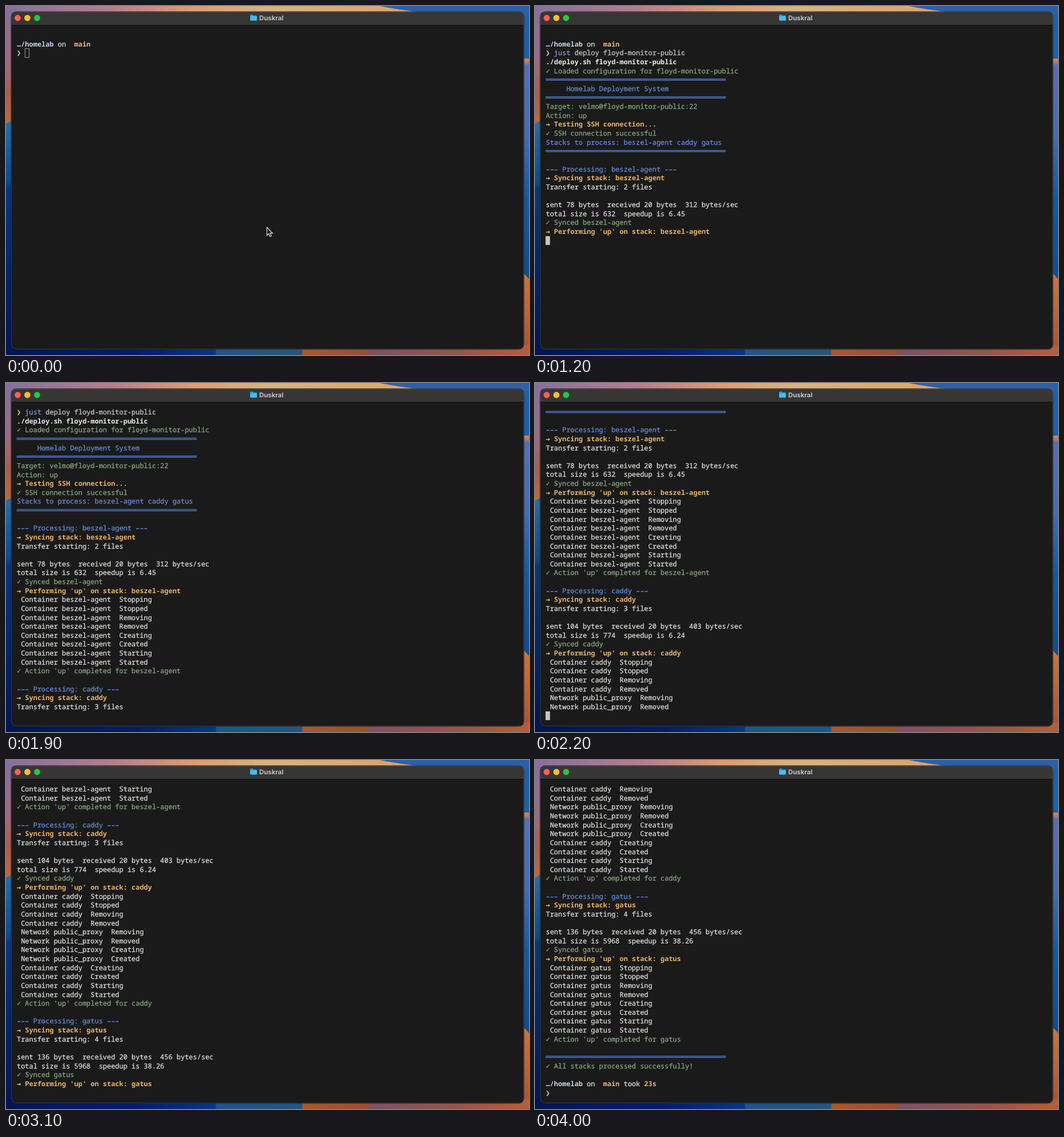
These frames come from a looping animation (917 px wide and 611 px high, 4.05 s). An HTML page:

```html
<!DOCTYPE html>
<html lang="en">
<head>
<meta charset="utf-8">
<title>Terminal deploy</title>
<style>
  html, body { margin: 0; width: 100%; height: 100%; overflow: hidden; background: #1a1a1a; }
  svg { display: block; width: 917px; height: 611px; }
  text { white-space: pre; text-rendering: geometricPrecision; }
  #screen text { font: 500 11.97px 'Noto Sans Mono', 'DejaVu Sans Mono', monospace; color: #d9dad6; fill: currentColor; stroke: currentColor; stroke-width: .3; }
  #screen .bold { font-weight: 700; color: #e6e9e2; stroke-width: 0; }
  #screen .blue { color: #6289d6; }
  #screen .green { color: #84a37c; }
  #screen .gold { color: #e8b15f; font-weight: 700; stroke-width: 0; }
  #screen .path { color: #c6d0e6; font-weight: 700; stroke-width: 0; }
  #screen .branch { color: #d9b878; font-weight: 700; stroke-width: 0; }
  #screen .command { color: #8099cb; }
  #screen .args { color: #c2c3c2; }
  #screen .caret { color: #b3c0ac; }
  #screen .mark { font: 700 11.9px 'DejaVu Sans Mono', monospace; stroke-width: .3; }
  .rule { fill: #4a6cb2; }
</style>
</head>
<body>
<svg viewBox="0 0 917 611">
  <defs>
    <linearGradient id="top">
      <stop offset="0" stop-color="#86709f"/>
      <stop offset=".2" stop-color="#b67d8e"/>
      <stop offset=".36" stop-color="#e09b70"/>
      <stop offset=".5" stop-color="#d9b37d"/>
      <stop offset=".72" stop-color="#dca66b"/>
    </linearGradient>
    <linearGradient id="left" x2="0" y2="1">
      <stop offset="0" stop-color="#86709f"/>
      <stop offset=".15" stop-color="#9b6b85"/>
      <stop offset=".25" stop-color="#a7604f"/>
      <stop offset=".34" stop-color="#bd6838"/>
    </linearGradient>
    <linearGradient id="sea" x2="0" y2="1">
      <stop offset="0" stop-color="#2a70a9"/>
      <stop offset=".27" stop-color="#0b4b8e"/>
      <stop offset=".3" stop-color="#06367d"/>
      <stop offset="1" stop-color="#031552"/>
    </linearGradient>
    <linearGradient id="right" x2="0" y2="1">
      <stop offset="0" stop-color="#285da5"/>
      <stop offset=".15" stop-color="#1763ad"/>
      <stop offset=".151" stop-color="#d07d50"/>
      <stop offset=".158" stop-color="#d07d50"/>
      <stop offset=".17" stop-color="#5470b0"/>
      <stop offset=".36" stop-color="#4a6cae"/>
      <stop offset=".55" stop-color="#17599f"/>
      <stop offset=".8" stop-color="#114c8e"/>
    </linearGradient>
    <linearGradient id="dune" x2="0" y2="1">
      <stop offset="0" stop-color="#cd783d"/>
      <stop offset="1" stop-color="#a84f38"/>
    </linearGradient>
    <linearGradient id="bottom">
      <stop offset="0" stop-color="#031552"/>
      <stop offset=".25" stop-color="#051d69"/>
      <stop offset=".4" stop-color="#073780"/>
      <stop offset=".403" stop-color="#205588"/>
      <stop offset=".565" stop-color="#225782"/>
      <stop offset=".568" stop-color="#a6592f"/>
      <stop offset=".69" stop-color="#955133"/>
      <stop offset=".7" stop-color="#7e5263"/>
      <stop offset=".87" stop-color="#95564a"/>
      <stop offset="1" stop-color="#b65d38"/>
    </linearGradient>
    <clipPath id="pane"><rect x="10" y="43" width="897" height="557" rx="2"/></clipPath>
  </defs>

  <g id="wallpaper">
    <rect width="917" height="14" fill="url(#top)"/>
    <rect width="18" height="611" fill="url(#left)"/>
    <path d="M0 206L18 196V611H0Z" fill="url(#sea)"/>
    <rect x="899" width="18" height="611" fill="url(#right)"/>
    <path d="M655 0Q700 9 760 14H917V0Z" fill="#2c61a8"/>
    <path d="M899 458L917 478V611H899Z" fill="url(#dune)"/>
    <rect y="594" width="917" height="17" fill="url(#bottom)"/>
  </g>

  <rect x="8.5" y="9.5" width="900" height="592" rx="9.5" fill="#171717"/>
  <rect x="9" y="10" width="899" height="591" rx="9" fill="#1a1a1a"/>
  <path d="M9 33V19a9 9 0 0 1 9-9H899a9 9 0 0 1 9 9V33Z" fill="#373635"/>
  <rect x="9" y="33" width="899" height="1" fill="#111"/>
  <rect x="9.5" y="10.5" width="898" height="590" rx="8.5" fill="none" stroke="#686868" stroke-opacity=".4"/>
  <circle cx="20.5" cy="21" r="5.4" fill="#fb5f58"/>
  <circle cx="37.5" cy="21" r="5.4" fill="#fcbc30"/>
  <circle cx="54.5" cy="21" r="5.4" fill="#2ac545"/>
  <path d="M428 16.5q0-1.5 1.5-1.5h3l1.5 1.4h4.5q1.5 0 1.5 1.5v6q0 1.5-1.5 1.5h-9q-1.5 0-1.5-1.5z" fill="#209ed8"/>
  <rect x="428" y="17.7" width="12" height="7.7" rx="1.3" fill="#42bdf2"/>
  <text x="444" y="24.7" font-family="Inter, sans-serif" font-size="11.4" font-weight="700" fill="#c4c3c2">Duskral</text>

  <g clip-path="url(#pane)">
    <g id="screen"><rect id="cursor"/></g>
  </g>
  <path id="pointer" d="M457.5 387.5V401.5L460.7 398.5L463 403.7L465.3 402.7L463 397.6H467.3Z" fill="#111" stroke="#eee" stroke-width="1.1"/>
</svg>

<script>
const NS = 'http://www.w3.org/2000/svg';
const LOOP = 4050, STEP = 50;
const LEFT = 19, TOP = 51, CELL = 7.182, PITCH = 15.63, ROWS = 35;
const TYPE_START = 100, TYPE_END = 450;
const HOST = 'floyd-monitor-public';
const INPUT_ROW = 2;

const screen = document.getElementById('screen');
const cursor = document.getElementById('cursor');
const pointer = document.getElementById('pointer');

const span = (text, style = '', col = 0) => ({ text, style, col });
const plain = text => [span(text)];
const blue = text => [span(text, 'blue')];
const green = text => [span(text, 'green')];
const done = text => [span('✓', 'green mark'), span(text, 'green', 2)];
const step = text => [span('→', 'gold mark'), span(text, 'gold', 2)];
const prompt = () => [span('…/homelab', 'path'), span('on', '', 10), span('main', 'branch', 14)];
const caret = () => span('❯', 'caret mark');
const blank = [];
const rule = 'rule';

const changes = (kind, name, stems) => stems
  .flatMap(stem => [`${stem}ing`, `${stem}ed`])
  .map(state => plain(` ${kind} ${name}  ${state}`));

const stack = (name, files, sent, rate, size, speedup, network) => [
  blue(`––– Processing: ${name} –––`),
  step(`Syncing stack: ${name}`),
  plain(`Transfer starting: ${files} files`),
  blank,
  plain(`sent ${sent} bytes  received 20 bytes  ${rate} bytes/sec`),
  plain(`total size is ${size}  speedup is ${speedup}`),
  done(`Synced ${name}`),
  step(`Performing 'up' on stack: ${name}`),
  ...changes('Container', name, ['Stopp', 'Remov']),
  ...(network ? changes('Network', network, ['Remov', 'Creat']) : []),
  ...changes('Container', name, ['Creat', 'Start']),
  done(`Action 'up' completed for ${name}`),
  blank
];

const lines = [
  blank,
  prompt(),
  [caret(), span('', 'command', 2), span('', 'args', 7)],
  [span(`./deploy.sh ${HOST}`, 'bold')],
  done(`Loaded configuration for ${HOST}`),
  rule,
  [span('Homelab Deployment System', 'blue', 5)],
  rule,
  green(`Target: velmo@${HOST}:22`),
  green('Action: up'),
  step('Testing SSH connection...'),
  done('SSH connection successful'),
  blue('Stacks to process: beszel-agent caddy gatus'),
  rule,
  blank,
  ...stack('beszel-agent', 2, 78, 312, 632, '6.45'),
  ...stack('caddy', 3, 104, 403, 774, '6.24', 'public_proxy'),
  ...stack('gatus', 4, 136, 456, 5968, '38.26'),
  rule,
  done('All stacks processed successfully!'),
  blank,
  [...prompt(), span('took', '', 19), span('23s', 'gold', 24)],
  [caret()]
];
const LAST_ROW = lines.length - 1;

// Time in ms at which the cursor reaches each row.
const progress = [
  [0, 2], [500, 11], [600, 17], [850, 18], [900, 23],
  [1250, 24], [1350, 28], [1450, 30], [1500, 31], [1550, 35],
  [1850, 36], [1950, 41], [2050, 42], [2150, 45], [2200, 47],
  [2300, 49], [2400, 50], [2500, 52], [2550, 53], [2600, 57],
  [2850, 58], [2900, 63], [3150, 64], [3350, 68], [3500, 70], [3600, LAST_ROW]
];

function set(node, attrs) {
  for (const key in attrs) node.setAttribute(key, attrs[key]);
}

function add(parent, tag, attrs, text = '') {
  const node = document.createElementNS(NS, tag);
  set(node, attrs);
  node.textContent = text;
  return parent.appendChild(node);
}

const rowNodes = lines.map((line, row) => {
  const group = add(screen, 'g', {});
  const y = TOP + row * PITCH;
  if (line === rule) {
    for (const dy of [-2.2, 0])
      add(group, 'rect', { class: 'rule', x: LEFT - 0.5, y: y + dy, width: 44 * CELL, height: 1.6 });
  } else {
    for (const { text, style, col } of line)
      add(group, 'text', { class: style, x: LEFT + col * CELL, y: y + 4.1 }, text);
  }
  return group;
});

const [commandNode, argsNode] = ['.command', '.args'].map(name => screen.querySelector(name));
const command = `just deploy ${HOST}`;

function drawCursor(time, row, col) {
  const focused = time >= TYPE_START;
  const typing = focused && time < 500;
  const lit = !focused || typing || (time + 155) % 260 < 130;
  set(cursor, {
    x: LEFT + col * CELL - (focused ? 0.5 : 0),
    y: TOP + row * PITCH - 7.5,
    width: focused ? 7.8 : 7.2,
    height: 15.3,
    fill: focused ? '#c9c5cc' : 'none',
    stroke: focused ? 'none' : '#a29aa5',
    visibility: lit ? 'visible' : 'hidden'
  });
}

function draw(time) {
  const row = progress.filter(([start]) => start <= time).pop()[1];
  const part = Math.min(1, Math.max(0, (time - TYPE_START) / (TYPE_END - TYPE_START)));
  const typed = Math.round(part * command.length);
  commandNode.textContent = command.slice(0, Math.min(typed, 4));
  argsNode.textContent = command.slice(5, Math.max(typed, 5));

  rowNodes.forEach((node, i) => {
    const isPrompt = i === INPUT_ROW || (i === LAST_ROW && row === LAST_ROW);
    node.style.display = i < row || isPrompt ? '' : 'none';
  });
  const scroll = Math.max(0, row - ROWS + 1);
  screen.setAttribute('transform', `translate(0 ${-scroll * PITCH})`);

  const col = row === INPUT_ROW ? 2 + typed : row === LAST_ROW ? 2 : 0;
  drawCursor(time, row, col);
  pointer.style.display = time < TYPE_START ? '' : 'none';
}

const start = performance.now();
function tick() {
  const time = (performance.now() - start) % LOOP;
  draw(Math.floor(time / STEP) * STEP);
  requestAnimationFrame(tick);
}
tick();
</script>
</body>
</html>
```
